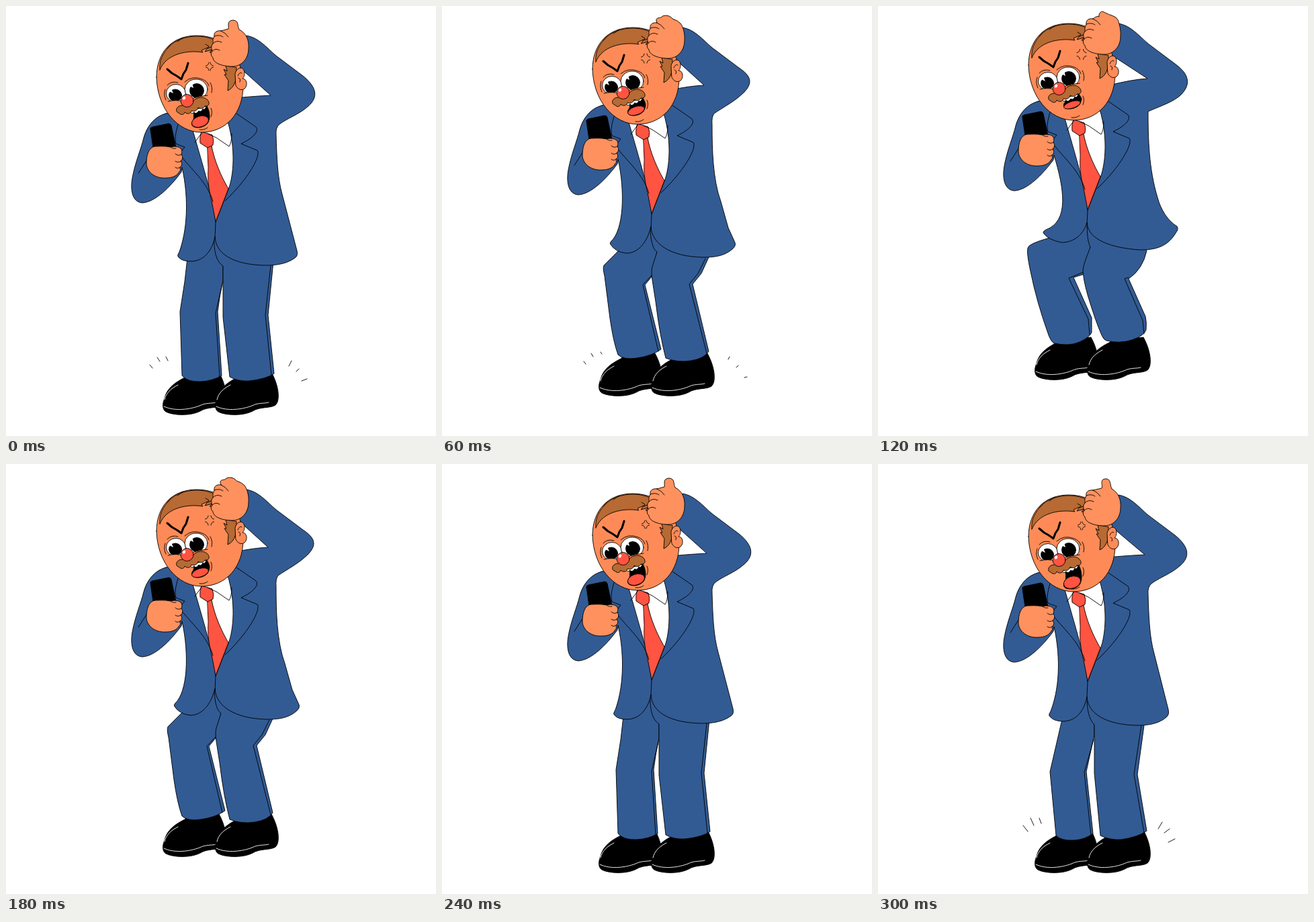
These frames come from a looping animation (640x640 px, 0.36 s). An HTML page:

```html
<!DOCTYPE html>
<html lang="en">
<head>
<meta charset="utf-8">
<title>Angry businessman</title>
<style>
  html, body { margin: 0; width: 100%; height: 100%; overflow: hidden; background: #fff; }
  svg { display: block; width: 100vw; height: 100vh; }
  path, ellipse { stroke: #000; stroke-width: .9; stroke-linejoin: round; stroke-linecap: round; }
  .suit { fill: #325b94; }
  .skin { fill: #fe8b57; }
  .hand { fill: #ff915e; }
  .hair { fill: #b76a33; }
  .red { fill: #ff5441; }
  .white { fill: #fff; }
  .line { fill: none; }
  .shine { fill: none; stroke: #fff; }
  .bare { stroke: none; }
</style>
</head>
<body>
<svg viewBox="0 0 640 640">
  <defs>
    <g id="shoe">
      <path d="M266 553C250 561 239 570 236 584C232 593 233 601 238 604C250 610 276 610 289 603C300 596 316 599 323 594C330 588 329 567 317 545L270 550Z"/>
      <path class="shine" d="M236 586C238 576 246 569 256 564M235 596C252 604 275 600 288 595C298 590 306 592 313 590"/>
    </g>
  </defs>

  <path id="marks" class="line"/>
  <g id="shoes"><use href="#shoe"/><use href="#shoe" x="78"/></g>
  <g id="legs">
    <path id="legL" class="suit"/>
    <path id="creaseL" class="line"/>
    <path id="legR" class="suit"/>
    <path id="creaseR" class="line"/>
  </g>

  <g id="top">
    <path id="jacket" class="suit"/>
    <path id="gap" class="white"/>

    <!-- shirt, tie and lapels -->
    <path class="white" d="M276 178L330 172C342 212 339 252 331 273L312 322C308 285 295 245 276 178Z"/>
    <path class="red" d="M300 209L306 208C311 235 324 260 331 272L312 321L306 290C299 262 301 250 301 240Z"/>
    <path class="red" d="M291 187L307 192Q310 200 308 207L300 211L289 204Q288 194 291 187Z"/>
    <path class="line" d="M281 203L292 188M300 190L313 196L332 209Q336 203 336 190"/>
    <path class="line" d="M257 172C254 185 250 195 253 205L266 210L258 220C275 243 300 262 308 291"/>
    <path class="line" d="M343 160L372 180C377 186 369 196 350 205L374 215C380 223 360 258 326 290M312 322L311 344"/>
    <path class="line" d="M197 249L213 224"/>

    <!-- head -->
    <path class="skin" d="M224 106C224 70 246 44 284 44C326 44 353 76 353 118C353 160 327 188 291 188C255 188 225 152 224 106Z"/>
    <path class="hair" d="M229 95C227 79 237 63 252 53C272 42 297 43 313 52L311 70L303 69L307 65L296 68L300 62L291 66L293 69C268 65 238 72 229 95Z"/>
    <path class="line" d="M240 63L247 55M255 53L264 47M297 57L302 60L300 63L308 60"/>
    <path class="hair" d="M327 89L329 97L324 94L328 102L325 102L331 111L330 126Q339 122 342 110L343 92Z"/>
    <path class="skin" d="M341 101C343 90 355 89 355 100C355 105 353 107 352 108C359 108 360 119 355 123C350 127 344 123 342 118Z"/>
    <path class="line" d="M345 104Q348 97 351 100M346 107Q350 108 348 113"/>
    <path class="line" d="M240 94L247 100L254 104L261 109L264 101L268 95L271 85" style="stroke-width:3"/>
    <path class="line" d="M237 124Q234 132 238 140M240 118Q246 111 256 114M266 113Q277 103 292 109Q300 112 302 119M304 114Q308 121 306 129M305 152Q308 158 305 165M288 184Q295 185 300 181"/>

    <ellipse class="white" cx="253" cy="130" rx="14.5" ry="13.5"/>
    <ellipse class="white" cx="283" cy="124" rx="17" ry="15"/>
    <ellipse cx="252" cy="133" rx="9.5" ry="9"/>
    <ellipse cx="284" cy="126" rx="10.5" ry="10.5"/>
    <path class="white bare" d="M249 130L243 127L246 123ZM279 122L273 119L277 115Z"/>
    <path class="skin bare" d="M240 142Q252 139 266 142L265 146L242 146ZM274 138Q287 134 300 133L296 140L276 142Z"/>
    <path class="line" d="M241 142Q252 139 264 142M276 138Q288 134 300 133"/>

    <path id="mouth"/>
    <ellipse id="tongue" class="red"/>
    <path class="white" d="M274 157Q276 162 280 158Q283 162 287 156Q290 159 293 153Q296 156 298 149Z"/>
    <path class="hair" d="M262 148C253 148 251 158 257 159C261 163 265 162 266 158C270 162 275 160 276 156C281 158 285 155 286 151C290 154 295 152 296 149C303 150 304 143 299 139C293 134 281 135 275 146Z"/>
    <ellipse class="red" cx="269.5" cy="141" rx="9.5" ry="9.5"/>
    <ellipse class="white bare" cx="265" cy="137" rx="2" ry="2.7" transform="rotate(35 265 137)"/>
    <path id="vein" class="line"/>

    <!-- phone and the hand around it -->
    <path d="M215 184Q214 181 218 180L242 175Q245 175 246 178L253 211L220 216Z"/>
    <path class="hand" d="M221 209C212 211 209 222 209 235C210 248 223 257 238 256C247 256 254 253 257 248Q261 245 259 240Q264 236 260 231Q265 226 261 221Q264 213 257 210Q251 208 245 210C236 208 227 209 221 209Z"/>
    <path class="line" d="M245 210Q248 213 253 212M261 221Q256 224 252 220M260 231Q256 234 252 231M259 240Q255 243 252 240"/>

    <path id="fist" class="hand"/>
    <path class="line" d="M310 45Q318 42 323 46M308 56Q313 50 321 54M307 67Q312 62 318 66M320 37Q327 40 331 46"/>
  </g>
</svg>

<script>
const el = id => document.getElementById(id);
const set = (id, attrs) => { for (const k in attrs) el(id).setAttribute(k, attrs[k]); };

const shoulder = 'M238 160L330 140L358 44C376 47 388 62 402 74L442 104';
const arm = 'L261 247C245 269 222 292 203 293C187 292 185 272 188 256C192 233 201 213 205 196C210 178 222 164 238 160Z';
const elbow = 'C463 121 465 136 450 149C437 161 417 168 407 176Q401 181 402 192';
const fistBody = 'C357 40 362 50 361 63C361 79 350 90 337 90C324 90 309 86 308 77Q303 72 307 67Q304 60 308 56Q307 49 310 45C309 39 314 36 320 37';

const poses = {
  stand: {
    elbow, tip: [394, 133], jaw: 181, spread: 0, thumb: 'L331 34C332 29 328 22 338 21C347 22 344 29 347 35',
    coat: 'C403 225 404 255 411 280L433 364Q435 372 430 375C415 386 395 386 385 386C340 385 312 370 311 343C308 360 297 380 275 380Q262 380 257 374Q254 372 258 366C269 335 273 290 262 240',
    legL: 'M270 375L266 410L259 455L262 550Q270 560 290 559Q308 558 321 550L315 455Q318 430 323 408L323 388L316 345L300 345Z',
    creaseL: 'M322 413L312 457L318 552',
    legR: 'M310 345C309 362 312 380 323 387L323 463L333 552Q345 559 362 558Q388 555 399 547L390 460L398 380Z',
    creaseR: 'M394 386L386 460L395 549'
  },
  stretch: {
    elbow, tip: [397, 133], jaw: 184, spread: 0, thumb: 'L333 34C335 29 329 21 339 20C347 20 345 29 348 35',
    coat: 'C403 225 404 255 411 280L432 363Q434 371 429 375C415 387 395 387 385 387C340 386 312 370 311 344C308 362 297 381 275 381Q262 381 256 374Q253 372 257 366C269 335 273 290 262 240',
    legL: 'M274 380L256 458L265 553Q272 561 292 560Q308 559 320 550L310 458L322 403L322 388L316 347L300 347Z',
    creaseL: 'M321 410L307 459L317 552',
    legR: 'M311 347C311 366 314 380 322 388L322 460L331 553Q345 560 362 559Q388 555 400 546L386 462L397 382Z',
    creaseR: 'M392 388L381 462L396 549'
  },
  bend: {
    elbow: 'C460 116 463 126 450 140C436 154 418 163 405 172Q401 177 402 189',
    tip: [390, 130], jaw: 175, spread: 2, thumb: 'C316 29 323 30 326 29C330 24 340 26 343 31Q352 34 355 38',
    coat: 'C402 225 403 270 415 303L426 342L436 364Q438 369 432 374C418 386 400 386 388 386C340 385 312 366 311 340C306 362 293 380 274 380Q258 378 251 367Q249 365 252 362C270 345 273 290 262 240',
    legL: 'M264 363L241 386Q239 390 242 402L250 465Q255 500 262 519Q270 527 290 524Q312 521 326 511L302 415L312 403L320 366L316 326L300 326Z',
    creaseL: 'M312 401L299 415L322 514',
    legR: 'M310 326C310 350 314 362 320 366L313 388Q311 395 313 408L318 440Q324 490 333 524Q350 531 370 528Q390 525 397 514L373 414L386 398L397 374L380 340Z',
    creaseR: 'M392 376L381 398L368 414L394 517'
  },
  crouch: {
    elbow: 'C463 119 466 134 452 149C442 160 420 167 402 175',
    tip: [401, 126], jaw: 171, spread: 3, thumb: 'Q326 32 329 34C328 28 333 24 338 28Q344 31 348 32Q355 34 358 40',
    coat: 'C402 215 403 260 416 303C421 322 432 338 445 346Q448 350 443 356C430 378 410 381 390 381C345 378 312 365 311 340C306 358 292 370 273 370Q254 366 247 357Q244 354 250 351C285 338 277 290 262 240',
    legL: 'M252 346Q224 354 223 360Q221 368 227 395Q236 440 254 490Q258 500 262 502Q285 507 300 500Q314 494 318 486L318 464L291 404L307 399L306 392L316 360L316 318L300 318Z',
    creaseL: 'M306 396L284 405L313 466L315 489',
    legR: 'M311 318C311 345 313 352 316 359Q306 384 305 392Q305 405 312 430Q324 470 333 490Q336 497 340 498Q360 503 378 497Q396 491 399 482Q400 470 398 462L373 406Q394 392 400 364L380 330Z',
    creaseR: 'M373 404L367 406L394 468L396 488'
  }
};

const lightMarks = 'M211 529L214 533M222 517L225 522M236 515L238 518M428 522L426 526M441 535L438 538M454 552L450 553';
const midMarks = 'M214 534L218 539M225 523L229 529M238 522L241 528M425 528L421 536M436 540L432 544M448 555L440 558';
const fullMarks = 'M216 538L223 547M227 527L232 538M240 527L243 535M423 533L417 543M434 543L426 549M442 558L432 563';

// Each step: pose, vertical shifts of upper body, legs and shoes, impact marks
const steps = [
  { pose: 'stand', top: 0, legs: 0, shoes: 0, marks: midMarks },
  { pose: 'bend', top: -12, legs: 0, shoes: -28, marks: lightMarks },
  { pose: 'crouch', top: -18, legs: 0, shoes: -52, marks: '' },
  { pose: 'bend', top: -6, legs: 5, shoes: -24, marks: '' },
  { pose: 'stand', top: 0, legs: 0, shoes: 0, marks: '' },
  { pose: 'stretch', top: 2, legs: 0, shoes: 0, marks: fullMarks }
];
const hold = 60;

function veinPath(spread) {
  const corner = (sx, sy) => {
    const p = (x, y) => `${303 + sx * (x + spread / 2)} ${90 + sy * (y + spread / 2)}`;
    return `M${p(5.5, 1)}Q${p(1.5, 1.5)} ${p(1, 6)}`;
  };
  return corner(1, 1) + corner(-1, 1) + corner(1, -1) + corner(-1, -1);
}

function mouthPath(b) {
  return `M275 157L299 149C303 156 304 ${b - 16} 302 ${b - 11}C301 ${b - 4} 292 ${b} 286 ${b}` +
    `C278 ${b} 275 ${b - 4} 277 ${b - 8}Q281 ${b - 13} 279 157Z`;
}

function draw(step) {
  const p = poses[step.pose];
  const [x, y] = p.tip;
  const ry = 5 + (p.jaw - 171) * 0.3;
  const cy = p.jaw - ry - 1;
  for (const id of ['top', 'legs', 'shoes']) set(id, { transform: `translate(0 ${step[id]})` });
  for (const id of ['legL', 'creaseL', 'legR', 'creaseR']) set(id, { d: p[id] });
  set('marks', { d: step.marks });
  set('jacket', { d: shoulder + p.elbow + p.coat + arm });
  set('gap', { d: `M346 90L${x} ${y}Q${x - 22} ${y + 1} 340 137Z` });
  set('mouth', { d: mouthPath(p.jaw) });
  set('tongue', { cx: 289, cy, rx: 13, ry, transform: `rotate(-18 289 ${cy})` });
  set('vein', { d: veinPath(p.spread) });
  set('fist', { d: 'M320 37' + p.thumb + fistBody + 'Z' });
}

let shown = -1;
function tick() {
  const i = Math.floor(performance.now() / hold) % steps.length;
  if (i !== shown) draw(steps[shown = i]);
  requestAnimationFrame(tick);
}
tick();
</script>
</body>
</html>
```
